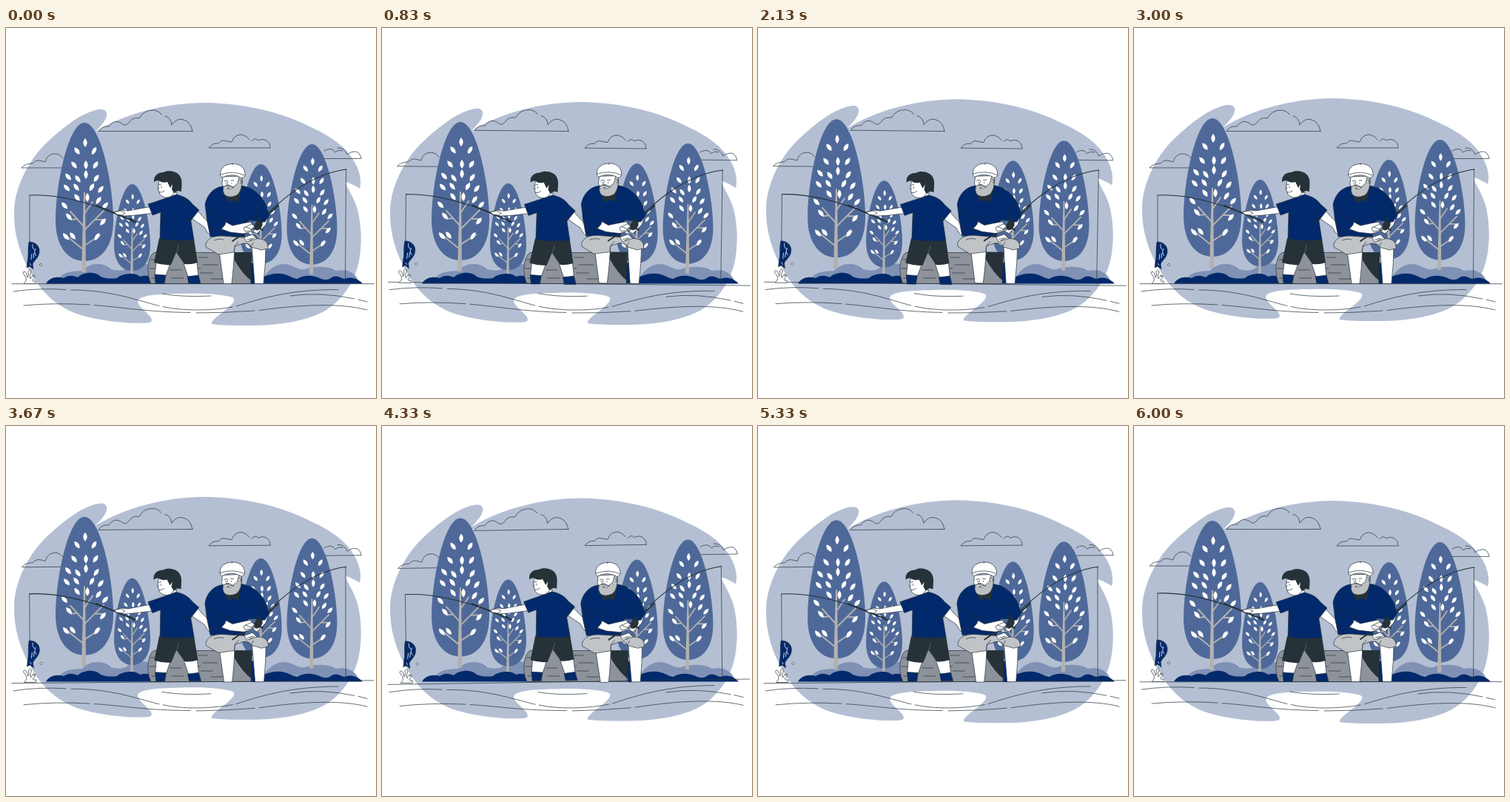
These frames come from a looping animation (500 by 500 pixels, 6040 ms). An HTML page:

```html
<!DOCTYPE html>
<html lang="en">
<head>
<meta charset="utf-8">
<title>Fishing day</title>
<style>
html, body { margin: 0; width: 100%; height: 100%; overflow: hidden; background: #fff; }
svg { display: block; width: 100vw; height: 100vh; }
.line { fill: none; stroke: #263238; stroke-width: .7; stroke-linecap: round; stroke-linejoin: round; }
.mid { stroke-width: 1.1; }
.thick { stroke-width: 1.9; }
.skin { fill: #fff; stroke: #263238; stroke-width: .7; stroke-linejoin: round; }
.navy { fill: #02296b; stroke: #263238; stroke-width: .6; stroke-linejoin: round; }
.dark { fill: #263238; }
.grey { fill: #bdc0c3; stroke: #263238; stroke-width: .7; stroke-linejoin: round; }
.bush { fill: #02296b; }
.pale { fill: #7f91b5; }
.bark { fill: none; stroke: #b3b1b0; stroke-linecap: round; }
</style>
</head>
<body>
<svg viewBox="0 0 500 500">
  <defs>
    <g id="tree">
      <path fill="#4e6999" d="M0 0C22 0 39 84 39 132C39 168 22 187 0 187S-39 168-39 132C-39 84-22 0 0 0Z"/>
      <path fill="#b3b1b0" d="M-1 94H1L2 202H-4Z"/>
      <path class="bark" stroke-width="2" d="M-1 146L26 119M-1 140L-19 120M0 166L21 152M-2 171L-28 150M0 123L11 107M14 131L24 131M-10 130L-18 131"/>
      <g id="leaves" fill="#fff"></g>
    </g>
  </defs>

  <g id="blob">
    <path fill="#b4bfd3" d="M11 247C12 216 29 182 50 160C75 135 105 112 127 110C137 109 138 117 134 124C130 131 124 136 121 140C158 117 213 101 270 101C324 102 374 114 414 135C440 147 460 161 471 181C478 193 481 207 478 217C473 214 467 210 459 208C460 216 468 224 474 242C479 258 481 281 479 300C477 329 465 356 440 376C413 397 365 402 330 402C309 402 291 402 278 400C276 396 289 387 298 380C305 374 312 367 306 364C292 359 258 358 235 359C210 359 184 361 179 367C175 373 187 381 193 388C198 393 198 397 194 398C173 401 126 396 98 387C72 378 50 360 36 335C19 308 10 278 11 247Z"/>
  </g>

  <g id="clouds" class="line">
    <path d="M252 139.5H125Q130 132 139 133Q146 123 155 128L159 131Q163 132 166 128Q171 120 180 122Q186 111 199 111Q207 112 210 117M215 119Q223 121 224 131Q231 121 240 124Q250 127 252 139.5"/>
    <path d="M357 162H274Q279 155 287 156Q292 150 298 153L305 154Q308 145 317 144Q325 145 329 151M332 153Q336 147 341 152Q349 148 354 154Q357 156 357 162"/>
    <path d="M82 189H21Q26 183 36 183Q41 177 49 180L53 181Q56 170 66 170Q73 170 77 176"/>
    <path d="M428 176.5H480Q478 166 470 167Q464 168 461 171Q457 161 448 162M430 166Q440 160 445 168Q449 164 455 166"/>
  </g>

  <path class="pale" d="M70 342C76 328 91 329 103 328C112 317 133 316 142 326C151 328 156 329 163 325C174 316 194 316 205 326V345H70Z
    M345 345C350 330 362 319 376 319C388 319 394 328 404 326C416 321 438 322 446 328C460 326 471 328 478 345Z"/>

  <g id="trees">
    <use href="#tree" transform="translate(106 128)"/>
    <use href="#tree" transform="translate(170.5 211) scale(.627)"/>
    <use href="#tree" transform="translate(344.5 184) scale(.72)"/>
    <use href="#tree" transform="translate(413.5 157) scale(.87)"/>
  </g>

  <path class="bush" d="M54 345.5C58 338 68 335 78 338C86 333 91 335 97 337C104 330 120 328 128 336C136 339 143 339 150 338C158 331 175 330 181 336C190 333 198 335 204 345.5Z
    M334 345.5C345 335 363 329 377 333C384 335 389 339 394 339C402 333 416 334 424 338C430 341 434 341 439 338C447 332 453 339 458 339C468 335 477 340 482 345.5Z"/>

  <g id="log">
    <path fill="#8d929b" stroke="#263238" stroke-width=".7" d="M200 303.5H331V345.5H196C190 335 190 310 200 303.5Z"/>
    <path class="line" d="M194 325H209M196 313H204M197 338H207M222 327H237M224 338H240M260 310H272M266 320H286M263 331H279M277 339H293M257 325H263"/>
  </g>

  <g id="water" class="line">
    <path d="M8 345.7H497"/>
    <path d="M10 356Q45 351 81 353.5M88 354C140 354 174 367 207 375.5M212 376.5C240 383 279 382 306 377M311 376C346 365 386 353 449 353.5"/>
    <path d="M24 375Q66 371 113 374M119 374.5C155 377 191 384 249 384.5M257 385Q297 385 336 382M342 381.5C398 374 451 371 488 381"/>
    <path d="M211 359C233 363 256 363 277 362M384 362Q425 356 471 366M476 367L488 370"/>
  </g>

  <g id="boy">
    <path class="skin" d="M203 316L201 335H216L222 318ZM240 318L246 336L260 335L258 316Z"/>
    <path class="navy" d="M201 333L202 345.5H214L216 334ZM245 336L247 345.5H263L260 334Z"/>
    <path class="dark" d="M207 284L200 317Q212 321 223 320L230 303L241 319Q250 320 259 317L254 285Z"/>
    <path class="line" style="stroke:#68737a" d="M231 303L233 294"/>
    <path class="skin" d="M256 243C262 252 270 258 274 264L281 280L277 281L272 276L268 269L249 256Z"/>
    <path class="skin" d="M198 241L165 247L156 246L146 249L150 253L161 254L175 253L200 250Z"/>
    <path class="skin" d="M219 224L217 233L230 233L231 222Z"/>
    <path class="navy" d="M216 230L230 225C240 227 247 231 252 238L261 246L250 260L249 255L254 286Q228 289 208 285L209 249L198 253L192 238Z"/>
    <path class="skin" d="M207 206L205 216L208 225Q214 231 222 228Q229 224 229 214L224 203Z"/>
    <path class="dark" d="M200 208C199 199 206 195 213 195C219 191 232 194 235 200C239 206 237 214 237 221L232 220L227 223L224 218L225 211L222 216L218 208Q211 210 206 206Q203 206 200 208Z"/>
    <path class="line" d="M207 222Q211 223 214 220M206 212L210 211M207 215L206 218M210 214V216M212 253L209 259M240 262L250 258"/>
    <path class="line mid" d="M32 226C70 224 114 237 150 251"/>
    <path class="line thick" d="M122 240L175 262"/>
    <path class="skin" d="M146 249L155 247L161 250L157 253L150 252Z"/>
    <path class="line mid" d="M167 258Q171 257 172 263"/>
    <path class="line" d="M32 226V291"/>
    <path class="navy" d="M31 289C40 289 46 295 45 303C44 311 38 314 36 319L37 326L32 322L28 324L29 315C31 308 29 298 31 289Z"/>
    <path fill="none" stroke="#fff" stroke-width=".8" d="M36 292Q35 298 39 300M40 298Q37 304 41 308M35 305L34 313M38 304L37 311M32 318L34 321"/>
    <path class="skin" d="M24 345.5Q30 340 25 334Q21 330 25 329Q28 330 29 337Q31 336 30 329Q33 325 34 330Q31 336 33 339Q35 334 39 335Q40 338 36 340Q35 343 40 342V345.5Z"/>
    <circle class="skin" cx="47" cy="320" r="1.5"/>
    <circle class="skin" cx="37" cy="335" r="1.2"/>
  </g>

  <g id="man">
    <path class="dark" d="M306 303H332V342Q320 333 309 314Z"/>
    <path class="navy" d="M331 319V345.5H338L336 315Z"/>
    <path class="skin" d="M288 301L294 345.5H305Q308 323 309 293ZM332 292L336 345.5H348Q351 318 351 293Z"/>
    <path class="navy" d="M292 214C280 216 271 226 269 239L272 262L276 282H322L328 260L345 261L355 255C355 238 342 222 329 216Q317 212 314 213Z"/>
    <path class="dark" d="M294 224L301 236L307 232L314 236L318 218Z"/>
    <path class="grey" style="fill:#c1c4c7" d="M270 296C269 286 279 280 294 281L344 285Q355 287 354 298L345 300L331 296Q331 291 321 291L309 295L308 303L287 306Z"/>
    <path class="line" d="M309 295L314 289M331 296L334 290M281 287Q289 284 294 286"/>
    <path class="skin" d="M293 201L292 211L294 216L303 222L319 211V200Z"/>
    <path class="grey" d="M294 214L301 212L307 215L313 210L315 201L319 200Q320 220 312 226Q301 231 295 225Q292 220 294 214Z"/>
    <path class="skin" d="M299 217Q304 219 308 215L303 215Z"/>
    <path class="skin" d="M290 200C288 190 295 184 306 183.5C317 183 324 190 323 200L319 203Q306 195 292 202Z"/>
    <path class="line" d="M290 198Q307 192 322 199M306 183V185M295 207L299 206M304 206L308 206M297 209V210M305 209V210M300 207L298 213L302 213M316 205Q320 205 317 210"/>
    <path class="line mid" d="M340 264C374 229 413 197 460 191"/>
    <path class="line thick" d="M306 288L340 265L368 240"/>
    <path class="line" d="M459.5 191L458.5 345"/>
    <path class="skin" d="M345 258L339 269L334 275L339 278L351 266L354 257Z"/>
    <path class="skin" d="M295 261L306 267L320 264L330 262L335 268L331 275L321 278L303 276L289 271Z"/>
    <path class="navy" d="M277 242L279 250L298 259L296 266L290 273L275 272L271 255Z"/>
    <path class="navy" d="M332 244L342 252L340 263L350 262L356 253L348 237Z"/>
    <ellipse class="dark" cx="341" cy="267" rx="5" ry="7" transform="rotate(35 341 267)"/>
    <path class="line thick" d="M341 270L347 273M339 262L344 257"/>
    <path class="skin" d="M321 270L332 265L336 268L330 274L323 275ZM322 283L333 279L339 285L325 289Z"/>
    <path class="line" d="M324 269L332 272M326 286L333 284M329 287L336 284"/>
  </g>
</svg>

<script>
const LOOP = 6040;
const byId = id => document.getElementById(id);

// Leaf centres relative to the tree top
const leaves = [
  [1, 27], [-10, 38], [13, 38], [-14, 57], [2, 57], [15, 57],
  [-22, 73], [-9, 76], [2, 70], [16, 75], [-24, 88], [-11, 87], [10, 87],
  [22, 90], [-27, 112], [-10, 101], [4, 101], [19, 105], [28, 112],
  [-21, 127], [25, 134], [17, 154], [-16, 153], [-25, 154]
];
byId('leaves').innerHTML = leaves.map(([x, y]) => {
  const turn = x < 0 ? -32 + x * .4 : x < 5 ? 0 : 22 + x * .7;
  return `<path d="M0-6Q5.4 0 0 6Q-5.4 0 0-6" transform="translate(${x} ${y}) rotate(${turn})"/>`;
}).join('');

const swaying = { clouds: [250, 150], water: [252, 365], boy: [152, 269], man: [364, 264] };

function swayAngle(p) {
  if (p < .25) return p * 4;
  return p < .75 ? 2 - p * 4 : p * 4 - 4;
}

function update(now) {
  const p = (now % LOOP) / LOOP;
  const lift = -3 * (1 - Math.cos(2 * Math.PI * p));
  for (const id of ['blob', 'trees']) byId(id).setAttribute('transform', `translate(0 ${lift})`);
  const angle = swayAngle(p);
  for (const [id, [x, y]] of Object.entries(swaying)) {
    byId(id).setAttribute('transform', `rotate(${angle} ${x} ${y})`);
  }
}

const start = performance.now();
function tick() {
  update(performance.now() - start);
  requestAnimationFrame(tick);
}
tick();
</script>
</body>
</html>
```
